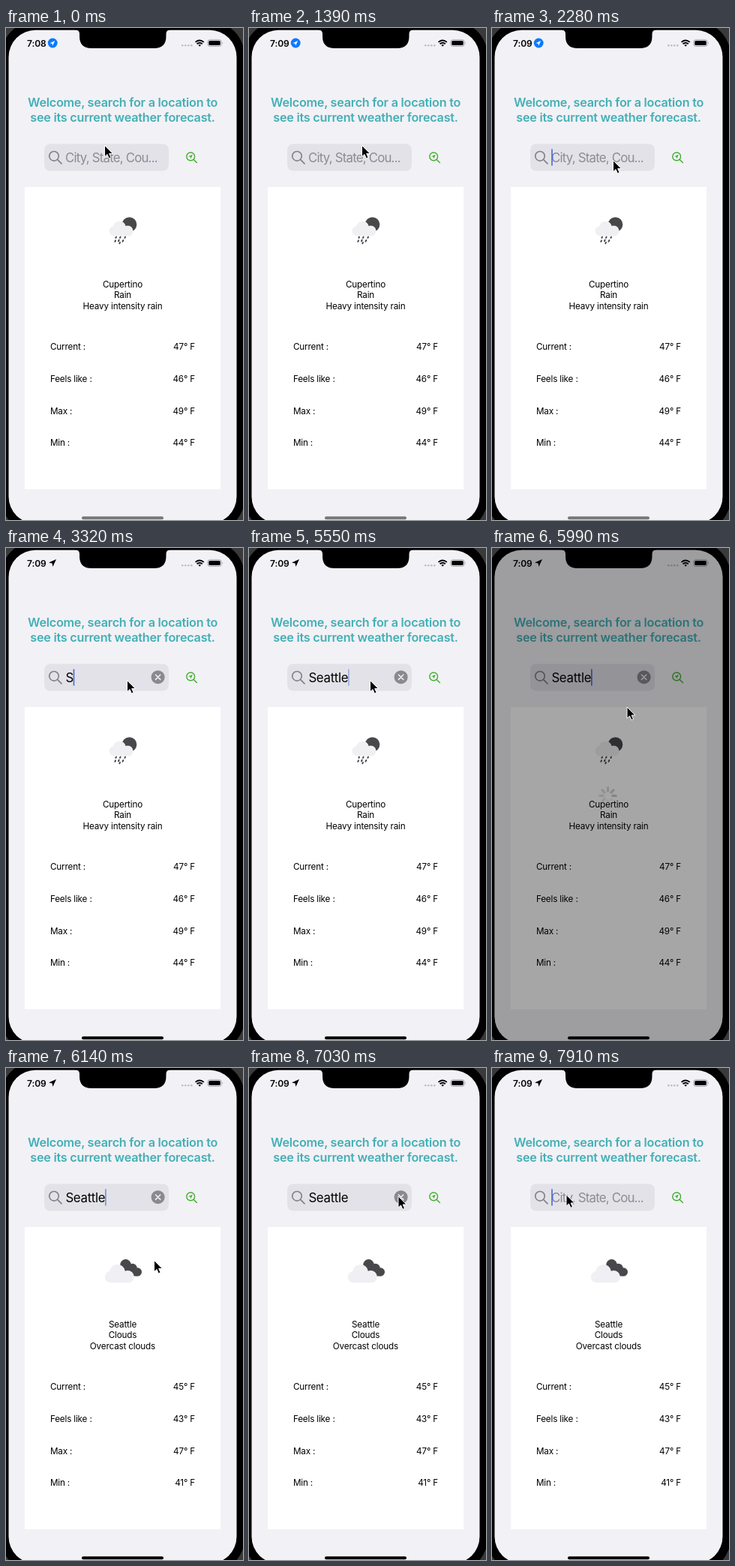
An HTML page for the animation above (8000 ms loop, 316 px wide and 656 px high).

```html
<!DOCTYPE html>
<html lang="en">
<head>
<meta charset="utf-8">
<title>Weather search</title>
<style>
  html, body { margin: 0; width: 100%; height: 100%; overflow: hidden; background: #000; }
  svg { display: block; width: 100%; height: 100%; }
  text { font: 11.7px Inter, Roboto, sans-serif; letter-spacing: -.16px; white-space: pre; }
  .title { font-size: 16.2px; font-weight: 600; letter-spacing: -.24px; fill: #42b0b5; }
  .clock { font-size: 12px; font-weight: 600; letter-spacing: -.1px; }
  .field { font-size: 16.8px; letter-spacing: -.3px; }
  #placeholder { letter-spacing: -.78px; fill: #8b8b90; }
  .mid { text-anchor: middle; }
  .end { text-anchor: end; }
  .line { fill: none; stroke-linecap: round; }
</style>
</head>
<body>
<svg viewBox="0 0 316 656">
  <defs>
    <path id="pin" d="M5-5L-5-.4L-.4.4L.4 5Z" stroke-linejoin="round"/>
  </defs>
  <rect width="316" height="656" fill="#3a3a3b"/>
  <rect x="-6.5" y="-9" width="324.5" height="682" rx="46"/>
  <rect x="3.5" y="2.7" width="304" height="658" rx="36" fill="#f2f1f6"/>

  <!-- Status bar -->
  <text id="clock" class="clock" x="28" y="24.5"></text>
  <g id="pinBlue">
    <circle cx="62.2" cy="20" r="6.4" fill="#0a7aff"/>
    <use href="#pin" transform="translate(61.8 20.4) scale(.68)" fill="#fff"/>
  </g>
  <use id="pinBlack" href="#pin" transform="translate(62 20)"/>
  <g fill="#bdbdc2">
    <circle cx="235.3" cy="23.3" r="1.3"/><circle cx="239.3" cy="23.3" r="1.3"/>
    <circle cx="243.3" cy="23.3" r="1.3"/><circle cx="247.3" cy="23.3" r="1.3"/>
  </g>
  <path d="M252.6 18.9Q258.2 13.9 263.8 18.9M254.6 21.3Q258.2 18.2 261.8 21.3"
    fill="none" stroke="#000" stroke-width="1.9"/>
  <path d="M256.4 22.8Q258.2 21.4 260 22.8L258.2 24.8Z"/>
  <rect x="269" y="15.8" width="18" height="8.6" rx="2.6" fill="none" stroke="#98989c" stroke-width=".9"/>
  <rect x="270.3" y="17.1" width="15.4" height="6" rx="1.5"/>
  <path d="M288.2 18.6q1.6 1.5 0 3z" fill="#98989c"/>

  <text class="title mid" x="155.5" y="105.2">Welcome, search for a location to</text>
  <text class="title mid" x="155.5" y="125.2">see its current weather forecast.</text>

  <!-- Search field -->
  <rect x="51" y="154.5" width="166" height="36" rx="8" fill="#e3e2e8"/>
  <g class="line" stroke="#838388" stroke-width="1.7">
    <circle cx="64" cy="170.8" r="6.3"/><path d="M68.6 175.4L74 180.8"/>
  </g>
  <text id="placeholder" class="field" x="79" y="179">City, State, Cou...</text>
  <text id="query" class="field" x="79.4" y="179"></text>
  <rect id="caret" y="161.5" width="1.6" height="22" fill="#4069dc"/>
  <g id="clear">
    <circle cx="202.6" cy="172.2" r="9" fill="#89898e"/>
    <path class="line" d="M199.4 169l6.4 6.4m0-6.4l-6.4 6.4" stroke="#f2f1f6" stroke-width="1.5"/>
  </g>
  <g class="line" stroke="#41ae2f" stroke-width="1.4">
    <circle cx="246.2" cy="171.4" r="5.4"/><path d="M250.2 175.4L254.4 179.6"/>
  </g>
  <use href="#pin" transform="translate(246 171.6) scale(.58)" fill="#41ae2f"/>

  <!-- Forecast card -->
  <rect x="25" y="212" width="261" height="403" fill="#fff"/>
  <g id="rainIcon">
    <circle cx="164.5" cy="262" r="9.8" fill="#48484b"/>
    <path d="M143.6 277.3a6.6 6.6 0 0 1-.6-13.1a8.6 8.6 0 0 1 16.6-.2a6.8 6.8 0 0 1 5.4 13.3z" fill="#f0f0f2"/>
    <path class="line" d="M147 278.6l-.6 1.2m6.2-1.2l-.6 1.2m7-1.2l-.6 1.2M146 283.4l-.7 1.4m5.4-2.2l-.8 1.6m6.4-1.2l-.8 1.6m-3.6 1.4l-.6 1.2"
      stroke="#4a4a55" stroke-width="2"/>
  </g>
  <g id="cloudIcon">
    <g fill="#48484b">
      <circle cx="159.5" cy="262.3" r="7.2"/><circle cx="168.5" cy="267" r="6.2"/>
      <circle cx="175.3" cy="272" r="5.7"/><path d="M158 268h16v9.5h-16z"/>
    </g>
    <path d="M139 286.2a7.6 7.6 0 0 1-.8-15.1a10.4 10.4 0 0 1 20.6-.4a8 8 0 0 1 7 15.5z" fill="#f0eff4"/>
  </g>
  <g id="labels"></g>

  <rect id="home" x="101" y="651.3" width="109" height="4" rx="2"/>

  <!-- Loading overlay -->
  <g id="loading">
    <rect x="3.5" y="2.7" width="304" height="658" rx="36" opacity=".35"/>
    <g id="spinner" class="line" stroke="#7c7c7e" stroke-width="3.2" transform="translate(154.5 330.3)"></g>
  </g>

  <path d="M93 0V2.7Q98 2.7 98 8V11Q98 27 114 27H197.5Q213.5 27 213.5 11V8Q213.5 2.7 218.5 2.7V0Z"/>
  <path id="cursor" d="M0 0V15.2L3.5 12L5.9 17.4L8.5 16.2L6.2 11H10.9Z" stroke="#fff" stroke-width="1" stroke-linejoin="round"/>
</svg>
<script>
const LOOP = 8000;
const $ = id => document.getElementById(id);

// Step tracks: [start time, value...]
const cursorTrack = [
  [0, 131.5, 156.5], [1390, 150.5, 156.5], [1540, 178, 171], [1690, 173, 176], [1840, 161.5, 176.5],
  [5700, 165.5, 176.5], [5850, 180, 212], [6000, 194, 249], [6140, 197.5, 256.5],
  [6580, 197.5, 248], [6730, 198.5, 215], [6880, 199, 182], [7030, 199, 171],
  [7170, 198, 169], [7620, 195, 169], [7770, 152, 169], [7910, 99, 169]
];
const queryTrack = [
  [0, ''], [3320, 'S'], [3620, 'Sea'], [3920, 'Seat'], [4060, 'Seatt'],
  [4360, 'Seattl'], [4650, 'Seattle'], [7320, '']
];
const caretTrack = [
  [0, 0], [2140, 1], [3030, .5], [3170, 0], [3320, 1],
  [5250, .5], [5400, 0], [5550, .45], [5700, 1], [6140, .7], [6290, 1],
  [6880, .5], [7030, 0], [7170, .5], [7320, 1]
];
const FOCUSED = 2290, LOAD_START = 5700, LOAD_END = 6140;

const cities = [
  { lines: ['Cupertino', 'Rain', 'Heavy intensity rain'], temps: [47, 46, 49, 44] },
  { lines: ['Seattle', 'Clouds', 'Overcast clouds'], temps: [45, 43, 47, 41] }
];

function add(parent, tag, attrs) {
  const el = document.createElementNS(parent.namespaceURI, tag);
  for (const key in attrs) el.setAttribute(key, attrs[key]);
  return parent.appendChild(el);
}

const summary = [0, 1, 2].map(i =>
  add($('labels'), 'text', { class: 'mid', x: 155.5, y: 346 + i * 14.4 }));
const temps = ['Current :', 'Feels like :', 'Max :', 'Min :'].map((name, i) => {
  const y = 429 + i * 42.8;
  add($('labels'), 'text', { x: 58.9, y }).textContent = name;
  return add($('labels'), 'text', { class: 'end', x: 252, y });
});
const spokes = Array.from({ length: 8 }, (_, i) =>
  add($('spinner'), 'path', { d: 'M0-6.3V-10.6', transform: `rotate(${i * 45})` }));

const at = (track, t) => track.findLast(step => step[0] <= t).slice(1);
const show = (id, visible) => $(id).style.display = visible ? '' : 'none';

function draw(t) {
  const [x, y] = at(cursorTrack, t);
  const [query] = at(queryTrack, t);
  const focused = t >= FOCUSED, loaded = t >= LOAD_END;
  const loading = t >= LOAD_START && !loaded;
  const city = cities[+loaded];

  $('cursor').setAttribute('transform', `translate(${x} ${y})`);
  $('clock').textContent = t < 500 ? '7:08' : '7:09';
  show('pinBlue', !focused);
  show('pinBlack', focused);
  $('home').setAttribute('fill', focused ? '#000' : '#77777a');

  $('query').textContent = query;
  show('placeholder', !query);
  show('clear', query);
  $('caret').setAttribute('x', 79.2 + (query ? $('query').getComputedTextLength() : 0));
  $('caret').setAttribute('opacity', at(caretTrack, t)[0]);

  show('rainIcon', !loaded);
  show('cloudIcon', loaded);
  summary.forEach((el, i) => el.textContent = city.lines[i]);
  temps.forEach((el, i) => el.textContent = city.temps[i] + '° F');

  show('loading', loading);
  const head = 8 + Math.floor((t - LOAD_START) / 140);
  spokes.forEach((el, i) => el.setAttribute('opacity', .8 - .09 * ((head - i + 16) % 8)));
}

function tick() {
  draw(performance.now() % LOOP);
  requestAnimationFrame(tick);
}
tick();
</script>
</body>
</html>
```
